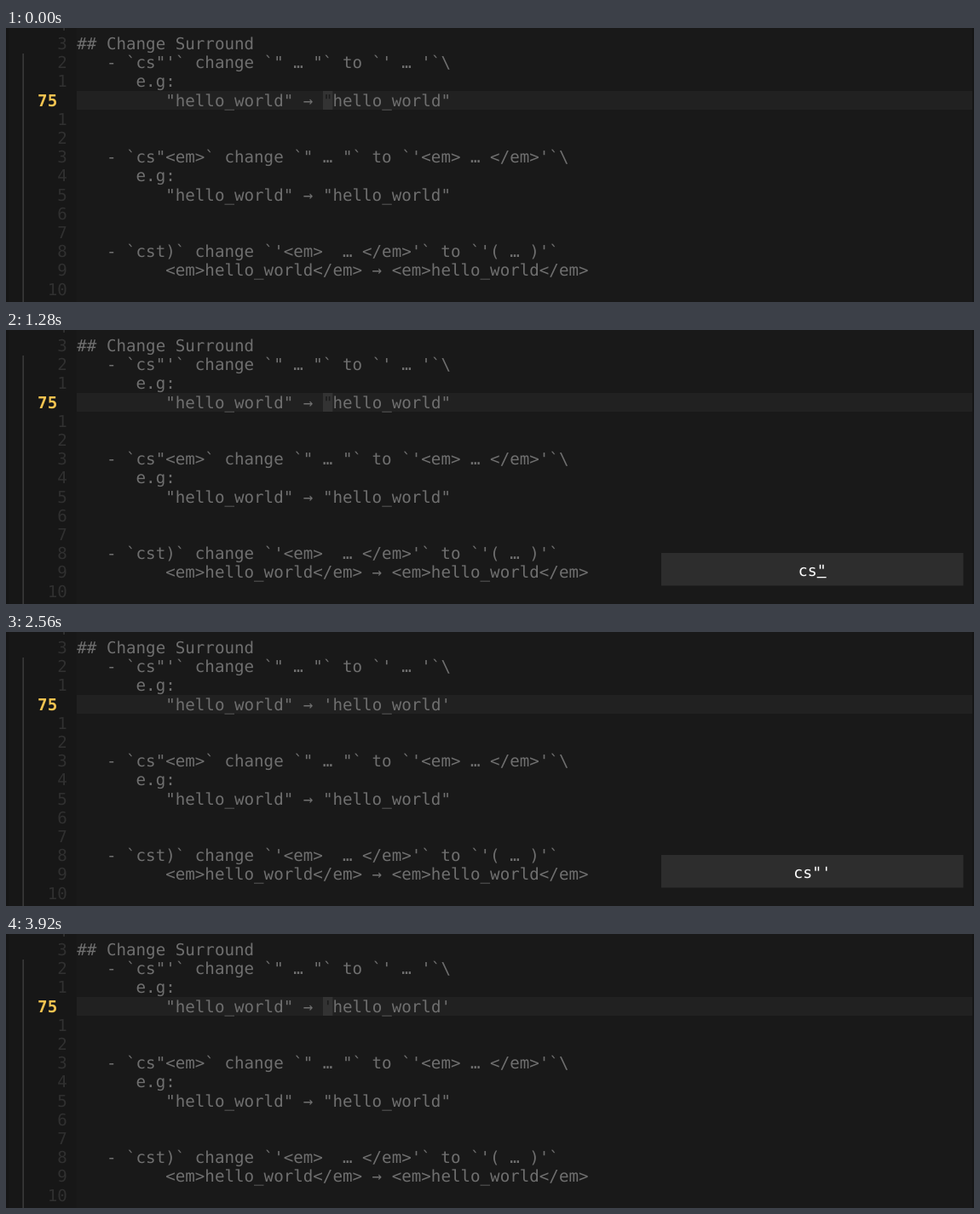
Write an HTML page that moves like this. It is 1136 px wide and 322 px high and loops after 4 s.

```html
<!DOCTYPE html>
<html lang="en">
<head>
<meta charset="utf-8">
<title>Change Surround</title>
<style>
  html, body { margin: 0; width: 100%; height: 100%; overflow: hidden; background: #191919; }
  svg { display: block; width: 1136px; height: 322px; }
  text {
    font-family: "DejaVu Sans Mono", monospace;
    font-size: 19.18px;
    white-space: pre;
    text-rendering: geometricPrecision;
    transform: rotate(.002deg); /* keeps fractional baselines from snapping */
    fill: #6f6f6f;
  }
  .num { fill: #303030; text-anchor: end; }
  .now { fill: #f5c451; font-weight: bold; }
  .dark { fill: #1b1b1b; }
  .key { fill: #fff; font-size: 18.2px; text-anchor: middle; }
</style>
</head>
<body>
<svg id="stage" viewBox="0 0 1136 322"></svg>
<script>
const LOOP = 4000;
const LEFT = 83.3, COL = 11.546, BASE = 25, ROW = 22.2;
const NUM_X = LEFT - COL;
const KEY_X = 946.2, KEY_W = 10.96;
const stage = document.getElementById('stage');

const lines = [
  [0, '## Change Surround'],
  [3, '- `cs"\'` change `" … "` to `\' … \'`\\'],
  [6, 'e.g:'],
  [9, '"hello_world" →'],
  [],
  [],
  [3, '- `cs"<em>` change `" … "` to `\'<em> … </em>\'`\\'],
  [6, 'e.g:'],
  [9, '"hello_world" → "hello_world"'],
  [],
  [],
  [3, '- `cst)` change `\'<em>  … </em>\'` to `\'( … )\'`'],
  [9, '<em>hello_world</em> → <em>hello_world</em>'],
  []
];

function add(tag, attrs, content = '') {
  const el = document.createElementNS('http://www.w3.org/2000/svg', tag);
  for (const name in attrs) el.setAttribute(name, attrs[name]);
  el.textContent = content;
  return stage.appendChild(el);
}

const rect = (x, y, width, height, fill) => add('rect', { x, y, width, height, fill });
const label = (x, y, content, cls = '') => add('text', { x, y, class: cls }, content);
const cell = (col, row, content, cls) => label(LEFT + col * COL, BASE + row * ROW, content, cls);

// Show an element only during the given [from, to] spans.
function during(el, ...spans) {
  const frames = [{ offset: 0, opacity: 0 }];
  for (const [from, to] of spans) {
    if (from === 0) frames.pop();
    frames.push({ offset: from / LOOP, opacity: 1 });
    if (to < LOOP) frames.push({ offset: to / LOOP, opacity: 0 });
  }
  const last = frames[frames.length - 1].opacity;
  frames.push({ offset: 1, opacity: last });
  for (const f of frames) f.easing = 'steps(1, end)';
  el.animate(frames, { duration: LOOP, iterations: Infinity });
}

// Editor background, fold line and current line
rect(0, 0, 3, 322, '#141414');
rect(3, 0, 80, 322, '#171717');
rect(1134, 0, 2, 322, '#141414');
rect(83, 74, 1051, 22, '#212121');
rect(19.5, 30, 1.3, 292, '#424242');

lines.forEach(([col, content], row) => {
  if (content) cell(col, row, content);
  if (row !== 3) label(NUM_X, BASE + row * ROW, Math.abs(row - 3), 'num');
});
label(NUM_X, BASE - ROW, 4, 'num');
cell(-4, 3, '75', 'now');

// Edited word and blinking cursor
const cursorOn = [[0, 320], [880, 2560], [3280, LOOP]];
const cursorOff = [[320, 880], [2560, 3280]];
during(rect(371.9, 74, 11.5, 22, '#333'), ...cursorOn);
cell(26, 3, 'hello_world');

function quotes(mark, from, to) {
  const within = spans => spans
    .map(([a, b]) => [Math.max(a, from), Math.min(b, to)])
    .filter(([a, b]) => a < b);
  during(cell(25, 3, mark), ...within(cursorOff));
  during(cell(25, 3, mark, 'dark'), ...within(cursorOn));
  during(cell(37, 3, mark), [from, to]);
}
quotes('"', 0, 1760);
quotes("'", 1760, LOOP);

// Pressed keys: text, span, and how many trailing keys are underlined for a moment
during(rect(769, 262, 354.5, 38.5, '#2d2d2d'), [880, 3920]);
const presses = [['cs', 880, 1280, 2], ['cs"', 1280, 1760, 1], ['cs"\'', 1760, 3920, 1]];
for (const [keys, from, to, fresh] of presses) {
  during(label(KEY_X, 288.6, keys, 'key'), [from, to]);
  const end = KEY_X + keys.length * KEY_W / 2;
  const line = rect(end - fresh * KEY_W, 290, fresh * KEY_W, 1.3, '#fff');
  during(line, [from, from + 240]);
}
</script>
</body>
</html>
```
